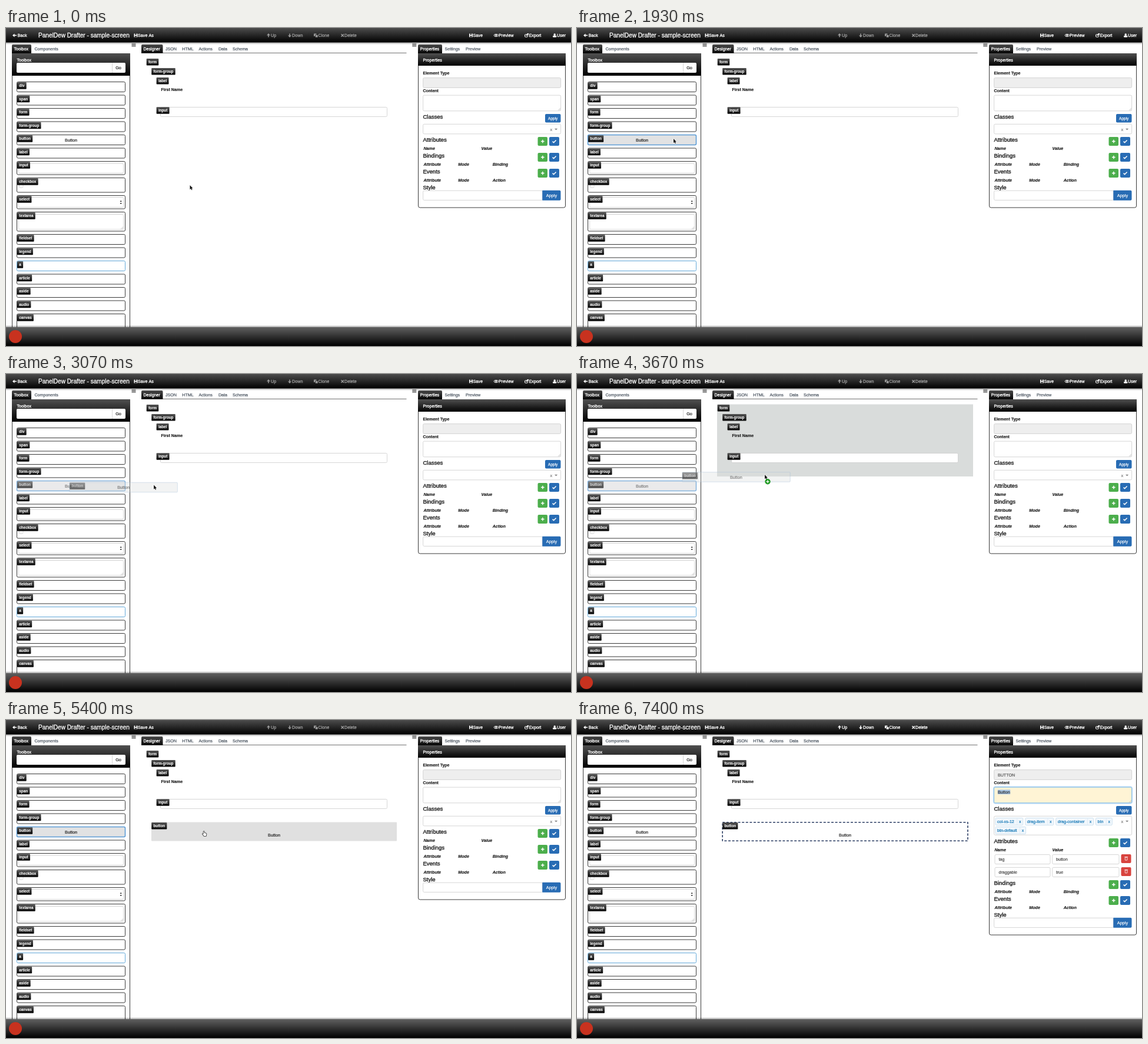
Animation of 960x540 px, one loop 8000 ms. Source, as an HTML page with a canvas:

```html
<!DOCTYPE html>
<html lang="en">
<head>
<meta charset="utf-8">
<title>Screen designer</title>
<style>
html, body { margin: 0; width: 100%; height: 100%; overflow: hidden; background: #fff; }
canvas { display: block; width: 960px; height: 540px; }
</style>
</head>
<body>
<canvas id="stage" width="960" height="540"></canvas>
<script>
const ctx = document.getElementById('stage').getContext('2d');
const LOOP = 8000, STEP = 1000 / 15;
const FONT = '"Liberation Sans", Arial, sans-serif';
const BLUE = '#286cb4', GREEN = '#4cae4c', RED = '#d8433e', INK = '#222', LINE = '#ccc', FRAME = '#3a3a3a';

const TIME = { hover: 1070, press: 1930, drag: 2470, enter: 3130, drop: 4470, over: 5270, click: 5800, leave: 7130, gone: 7400 };

const TRACK = [
  [400, 312.5, 267], [600, 284, 252], [930, 203, 204], [1100, 172, 191], [1270, 158, 188],
  [1530, 164, 188], [2400, 164, 188], [2670, 182, 188.5], [2930, 226, 191], [3270, 287, 185],
  [3670, 319, 171], [4000, 322, 171], [5070, 322, 171], [5400, 335, 189], [7000, 335, 189],
  [7130, 420, 240], [7270, 590, 225], [7400, 745, 122]
];

const TOOLS = [
  ['div'], ['span'], ['form'], ['form-group'], ['button'], ['label'], ['input', 22.5],
  ['checkbox', 24.5], ['select', 22.5], ['textarea', 32.5], ['fieldset'], ['legend'], ['a'],
  ['article'], ['aside'], ['audio'], ['canvas', 30]
];

// A thin outline gives the slightly heavy look of smoothed screen text.
function text(s, x, y, size = 7.1, color = INK, style = '', align = 'left', weight = 0.2) {
  ctx.font = `${style} ${size}px ${FONT}`;
  ctx.fillStyle = ctx.strokeStyle = color;
  ctx.textAlign = align;
  ctx.lineWidth = weight;
  ctx.lineJoin = 'round';
  ctx.strokeText(s, x, y);
  ctx.fillText(s, x, y);
}

const heading = (s, y) => text(s, 708.5, y, 9.5, INK, '', 'left', 0.4);
const light = (s, x, y, size = 7.1) => text(s, x, y, size, '#fff', '', 'left', 0.3);

function box(x, y, w, h, fill, stroke, r = 2, lw = 0.8) {
  ctx.beginPath();
  ctx.roundRect(x, y, w, h, r);
  if (fill) { ctx.fillStyle = fill; ctx.fill(); }
  if (stroke) { ctx.strokeStyle = stroke; ctx.lineWidth = lw; ctx.stroke(); }
}

function poly(points, fill, stroke, lw = 0.8) {
  ctx.beginPath();
  points.forEach(([x, y]) => ctx.lineTo(x, y));
  ctx.closePath();
  if (stroke) { ctx.strokeStyle = stroke; ctx.lineWidth = lw; ctx.lineJoin = 'round'; ctx.stroke(); }
  ctx.fillStyle = fill;
  ctx.fill();
}

function line(x1, y1, x2, y2, color, lw = 1) {
  ctx.beginPath();
  ctx.moveTo(x1, y1);
  ctx.lineTo(x2, y2);
  ctx.strokeStyle = color;
  ctx.lineWidth = lw;
  ctx.stroke();
}

function shade(x, y, w, h, top, bottom, r = 0) {
  const g = ctx.createLinearGradient(0, y, 0, y + h);
  g.addColorStop(0, top);
  g.addColorStop(1, bottom);
  box(x, y, w, h, g, null, r);
}

function dashed(x, y, w, h, color) {
  ctx.setLineDash([4, 2.6]);
  ctx.strokeStyle = color;
  ctx.lineWidth = 1.6;
  ctx.strokeRect(x, y, w, h);
  ctx.setLineDash([]);
}

function tag(s, x, y) {
  ctx.font = `bold 6.3px ${FONT}`;
  shade(x, y, ctx.measureText(s).width + 6.6, 11.5, '#555', '#050505', 1);
  text(s, x + 3.3, y + 7.7, 6.3, '#fff', 'bold', 'left', 0.1);
}

function at(t) {
  let i = TRACK.findIndex(k => k[0] > t);
  if (i < 0) i = TRACK.length;
  const a = TRACK[Math.max(i - 1, 0)], b = TRACK[Math.min(i, TRACK.length - 1)];
  const p = a === b ? 0 : (t - a[0]) / (b[0] - a[0]);
  return [a[1] + (b[1] - a[1]) * p, a[2] + (b[2] - a[2]) * p];
}

// Icons

const ICONS = {
  left(x, y, c) { line(x + 2, y, x + 7, y, c, 1.6); poly([[x, y], [x + 3.5, y - 3], [x + 3.5, y + 3]], c); },
  up(x, y, c) { line(x + 3, y - 1, x + 3, y + 3, c, 1.6); poly([[x, y], [x + 3, y - 3.4], [x + 6, y]], c); },
  down(x, y, c) { line(x + 3, y + 1, x + 3, y - 3, c, 1.6); poly([[x, y], [x + 3, y + 3.4], [x + 6, y]], c); },
  save(x, y, c) {
    box(x, y - 3, 6, 6, c, null, 0.5);
    box(x + 1.6, y - 3, 2.6, 2, '#111', null, 0);
    box(x + 1.3, y + 0.8, 3.4, 2.2, '#333', null, 0);
  },
  clone(x, y, c) { box(x, y - 3, 4.5, 4.5, c, null, 0.5); box(x + 2.5, y - 1, 4.5, 4.5, c, '#111', 0.5, 0.6); },
  cross(x, y, c) { line(x + 0.5, y - 2.3, x + 5, y + 2.3, c, 1.6); line(x + 5, y - 2.3, x + 0.5, y + 2.3, c, 1.6); },
  eye(x, y, c) {
    ctx.beginPath();
    ctx.ellipse(x + 3.7, y, 3.5, 2.1, 0, 0, 7);
    ctx.strokeStyle = c;
    ctx.lineWidth = 1;
    ctx.stroke();
    box(x + 2.3, y - 1.5, 2.8, 2.8, c, null, 1.4);
  },
  share(x, y, c) {
    box(x + 0.5, y - 1.5, 5, 4.2, null, c, 0.8, 1);
    line(x + 2.5, y + 0.5, x + 5.5, y - 2.2, c, 1.2);
    poly([[x + 4, y - 3.4], [x + 7, y - 3.4], [x + 7, y - 0.4]], c);
  },
  user(x, y, c) {
    box(x + 1.5, y - 3.2, 3.4, 3.8, c, null, 1.7);
    box(x, y + 0.4, 6.4, 2.8, c, null, 1.2);
  }
};

function action(icon, label, x, gap, color = '#fff') {
  ICONS[icon](x, 12.5, color);
  text(label, x + gap, 15, 7.2, color, '', 'left', 0.3);
}

function menuIcon(x) {
  for (let y = 27; y < 33; y += 2) line(x, y, x + 7, y, '#444', 1.1);
}

function plusButton(y) {
  box(903.5, y, 16.5, 15, GREEN, null);
  line(909, y + 7.5, 914.6, y + 7.5, '#fff', 1.5);
  line(911.8, y + 4.7, 911.8, y + 10.3, '#fff', 1.5);
  box(923, y, 17, 15, BLUE, null);
  ctx.beginPath();
  ctx.moveTo(928.6, y + 7.6);
  ctx.lineTo(930.7, y + 9.6);
  ctx.lineTo(934.6, y + 5.4);
  ctx.strokeStyle = '#fff';
  ctx.lineWidth = 1.5;
  ctx.stroke();
}

function trashButton(y) {
  box(924.5, y, 17, 15, RED, null);
  box(931.3, y + 5, 3.6, 5, null, '#fff', 0.4, 0.8);
  line(930.3, y + 4.5, 936, y + 4.5, '#fff', 0.8);
}

function grip(x, y) {
  line(x - 4, y, x, y - 4, '#aaa', 0.6);
  line(x - 2, y, x, y - 2, '#aaa', 0.6);
}

// Panels

function topBar(active) {
  const c = active ? '#fff' : '#9a9a9a';
  shade(0, 24, 960, 4, 'rgba(0,0,0,.4)', 'rgba(0,0,0,0)');
  shade(0, 0, 960, 24.5, '#4c4c4c', '#000');
  action('left', 'Back', 11, 8.5);
  light('PanelDew Drafter - sample-screen', 55, 16, 10.1);
  action('save', 'Save As', 217.5, 6.5);
  action('up', 'Up', 443, 7, c);
  action('down', 'Down', 479, 7, c);
  action('clone', 'Clone', 523, 7.5, c);
  action('cross', 'Delete', 569, 6, c);
  action('save', 'Save', 787, 6.5);
  action('eye', 'Preview', 829, 8);
  action('share', 'Export', 881, 7.5);
  action('user', 'User', 929, 7);
}

function footer() {
  shade(0, 504.5, 960, 4, 'rgba(0,0,0,0)', 'rgba(0,0,0,.4)');
  shade(0, 508, 960, 32, '#606060', '#000');
  ctx.beginPath();
  ctx.arc(16, 524, 11, 0, 7);
  ctx.fillStyle = '#c8321f';
  ctx.fill();
}

function tabs(x, w, names) {
  shade(x, 28, w, 15, '#4a4a4a', '#050505', [2, 2, 0, 0]);
  names.forEach(([s, tx], i) => i ? text(s, tx, 38, 7.1, '#46505c') : light(s, tx, 38));
}

function toolBox(y, h, fill, stroke = FRAME, lw = 1) {
  box(18.5, y, 184, h, fill, stroke, 2, lw);
}

function buttonTool(y, t) {
  const dragging = t >= TIME.drag && t < TIME.drop;
  const focus = t >= TIME.press && t < TIME.click;
  const hover = t >= TIME.hover && t < TIME.press;
  ctx.save();
  if (dragging) ctx.globalAlpha = 0.7;
  if (focus) toolBox(y, 17, '#e1e2e3', '#5b9bd5', 1.6);
  else toolBox(y, 17, hover ? '#e6e6e6' : '#fff');
  tag('button', 19, y + 0.8);
  text('Button', 110.5, y + 11.5, 7.2, dragging ? '#555' : INK, '', 'center');
  ctx.restore();
}

function toolPanel(t) {
  tabs(10, 33, [['Toolbox', 13.5], ['Components', 48.5]]);
  shade(10, 43, 201, 38, '#505050', '#000');
  light('Toolbox', 18.5, 56.6);
  box(18, 59, 185, 17, '#fff', null);
  line(180.5, 59, 180.5, 76, LINE, 0.8);
  text('Go', 191, 70.2, 7.3, INK, '', 'center');
  line(10.5, 81, 10.5, 508, FRAME);
  line(210.5, 81, 210.5, 508, FRAME);
  menuIcon(213.5);

  let y = 91.5;
  for (const [name, h = 17] of TOOLS) {
    if (name === 'button') {
      buttonTool(y, t);
    } else {
      toolBox(y, h, '#fff', name === 'a' ? '#62a8d8' : FRAME);
      if (name === 'input') box(21.5, y + 3.5, 178, 16.5, null, LINE);
      if (name === 'checkbox') box(22.5, y + 10, 6.5, 6.5, '#fff', LINE, 1.5);
      if (name === 'select') {
        box(21.5, y + 3, 178, 17, null, LINE);
        poly([[193.6, y + 10.6], [195.2, y + 8.2], [196.8, y + 10.6]], '#222');
        poly([[193.6, y + 12.4], [195.2, y + 14.8], [196.8, y + 12.4]], '#222');
      }
      if (name === 'textarea') { box(21.5, y + 4, 178, 25.5, null, LINE); grip(199, y + 29); }
      tag(name, 19, y + 0.8);
    }
    y += h + 5.5;
  }
}

function designer(t) {
  tabs(230, 36.5, [['Designer', 233.5], ['JSON', 271], ['HTML', 299.3], ['Actions', 327.5], ['Data', 361], ['Schema', 385]]);
  line(230, 42.4, 680.5, 42.4, '#333', 0.7);
  menuIcon(690.3);
  if (t >= TIME.enter && t < TIME.drop) box(238, 51.5, 435, 122.5, '#d9dcdb', null, 0);
  if (t >= TIME.drop && t < TIME.over) dashed(238.7, 51.7, 433.8, 164, '#2488cc');

  box(262.5, 134.5, 385, 16, '#fff', LINE);
  tag('form', 238.7, 52);
  tag('form-group', 247.2, 68);
  tag('label', 255.6, 84);
  text('First Name', 263.5, 106.6, 7.1, INK, 'bold');
  tag('input', 255.6, 134.2);

  if (t < TIME.drop) return;
  if (t >= TIME.over && t < TIME.leave) box(247, 173.5, 417, 32, '#e0e0e0', null, 1);
  if (t >= TIME.click) dashed(247.2, 173.7, 416.8, 31.6, '#2c3e64');
  tag('button', 247.2, 174);
  text('Button', 455.5, 198, 7.2, INK, '', 'center');
}

function section(name, y, columns) {
  heading(name, y);
  plusButton(y - 8);
  columns.forEach(([s, x]) => text(s, x, y + 14, 7.1, INK, 'italic bold'));
}

function chips(x, y, names) {
  for (const name of names) {
    ctx.font = `7.1px ${FONT}`;
    const w = ctx.measureText(name).width;
    box(x, y, w + 18, 12.3, '#f1f7fc', '#c6dcec', 1.5);
    line(x + w + 8, y, x + w + 8, y + 12.3, '#dbe8f2', 0.7);
    text(name, x + 3, y + 8.4, 7.1, '#0f74b4');
    text('x', x + w + 13, y + 8.4, 7.1, '#0f74b4', '', 'center');
    x += w + 22;
  }
}

function attribute(y, name, value) {
  box(710, y, 94, 16, '#fff', LINE);
  box(807.7, y, 113.3, 16, '#fff', LINE);
  text(name, 716.5, y + 10.4, 7.1, '#444');
  text(value, 814, y + 10.4, 7.1, '#444');
  trashButton(y - 0.5);
}

function properties(active) {
  const grow = active ? 60 : 0;
  tabs(700, 41, [['Properties', 703.8], ['Settings', 745.5], ['Preview', 781]]);
  box(700.5, 43.5, 250, 261.5 + grow, '#fff', FRAME, [0, 0, 3, 3], 1);
  shade(700, 43, 251, 21, '#505050', '#000');
  light('Properties', 708.5, 56.6);

  text('Element Type', 708.5, 79.4, 7, INK, 'bold');
  box(708.6, 84.6, 234, 16.8, '#eee', LINE);
  text('Content', 708.5, 109, 7, INK, 'bold');
  if (active) {
    text('BUTTON', 715, 95.6, 7.1, '#555');
    box(708, 113.6, 235, 27.8, null, 'rgba(102,175,233,.35)', 3, 2.6);
    box(708.6, 114.2, 234, 26.6, '#fff4d5', '#66afe9');
    box(714.8, 118.4, 21.4, 7.8, '#a8c3e0', null, 0);
    text('Button', 715, 124.9, 7.2, '#333');
  } else {
    box(708.6, 114.2, 234, 26.6, '#fff', LINE);
  }
  grip(942, 140);

  heading('Classes', 154);
  box(916, 146, 26.5, 14.6, BLUE, null);
  text('Apply', 929.2, 155.7, 6.5, '#fff', '', 'center');
  box(708.6, 163.3, 234, active ? 32 : 16.5, '#fff', LINE);
  text('x', 926.4, 174.8, 7.5, '#777', '', 'center');
  poly([[932, 170.7], [937.2, 170.7], [934.6, 173.6]], '#888');

  const bindCols = last => [['Attribute', 709.5], ['Mode', 768.3], [last, 826.7]];
  section('Attributes', active ? 209 : 193, [['Name', 709.5], ['Value', 807.5]]);
  if (active) {
    chips(711, 166.3, ['col-xs-12', 'drag-item', 'drag-container', 'btn']);
    chips(711, 181.3, ['btn-default']);
    attribute(228.6, 'tag', 'button');
    attribute(250.4, 'draggable', 'true');
  }
  section('Bindings', 220 + grow, bindCols('Binding'));
  section('Events', 247 + grow, bindCols('Action'));
  heading('Style', 274 + grow);
  box(708.6, 276.2 + grow, 203, 16.2, '#fff', LINE);
  box(911.3, 275.8 + grow, 31.2, 17, BLUE, null, [0, 2, 2, 0]);
  text('Apply', 926.9, 286.8 + grow, 7.3, '#fff', '', 'center');
}

// Pointer and dragged copy

function ghost(x, y, t) {
  const lead = 5 * Math.min(Math.max((t - 2670) / 1000, 0), 1);
  ctx.save();
  ctx.globalAlpha = 0.55;
  ctx.translate(x - 145.3 + lead, y - 4.3);
  box(0, 0, 183.5, 16.5, 'rgba(215,217,219,.6)', '#a5bfd8', 1);
  tag('button', 0.3, 0.3);
  text('Button', 91.7, 11.2, 7.2, '#333', '', 'center');
  ctx.restore();
}

function arrow(x, y) {
  const shape = [[0, 0], [0, 7.2], [1.7, 5.7], [2.8, 8.2], [4, 7.7], [2.9, 5.3], [5, 5.2]];
  poly(shape.map(([a, b]) => [x + a, y + b]), '#111', '#fff', 1.1);
}

function hand(x, y) {
  const shape = [[0.6, 0.3], [1.8, 0.3], [2, 3], [5, 3.6], [5.6, 4.6], [4.8, 8], [1.5, 8], [-1.2, 4.6], [-0.6, 4], [0.6, 5]];
  poly(shape.map(([a, b]) => [x + a, y + b]), '#fff', '#222', 1.5);
}

function copyBadge(x, y) {
  ctx.beginPath();
  ctx.arc(x, y, 4.7, 0, 7);
  ctx.fillStyle = '#1f9a22';
  ctx.fill();
  line(x - 2.5, y, x + 2.5, y, '#fff', 1.3);
  line(x, y - 2.5, x, y + 2.5, '#fff', 1.3);
}

function pointer(t) {
  if (t >= TIME.gone) return;
  const [x, y] = at(t);
  const dragging = t >= TIME.drag && t < TIME.drop;
  if (dragging) ghost(x, y, t);
  if (t >= TIME.over && t < TIME.leave) hand(x, y);
  else arrow(x, y);
  if (dragging && t >= TIME.enter) copyBadge(x + 5, y + 11.7);
}

function draw(t) {
  const active = t >= TIME.click;
  ctx.fillStyle = '#fff';
  ctx.fillRect(0, 0, 960, 540);
  toolPanel(t);
  designer(t);
  properties(active);
  topBar(active);
  footer();
  pointer(t);
}

// The picture advances 15 times a second.
function tick() {
  const k = Math.floor((performance.now() % LOOP + 4) / STEP);
  draw(Math.round(k * STEP / 10) * 10 % LOOP);
  requestAnimationFrame(tick);
}
tick();
</script>
</body>
</html>
```
